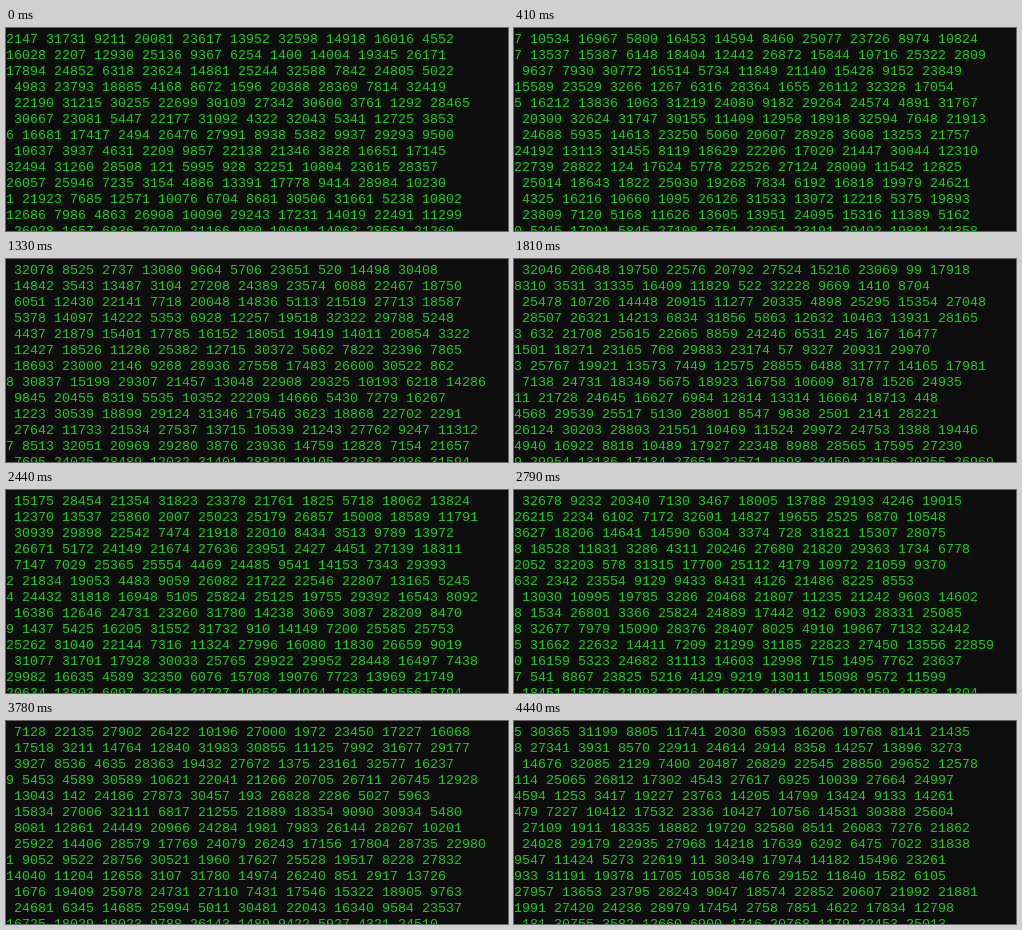
Animation of 502x203 px, one loop 4510 ms. Source, as an HTML page with a canvas:

```html
<!DOCTYPE html>
<html lang="en">
<head>
<meta charset="utf-8">
<title>Random numbers</title>
<style>
  html, body { margin: 0; width: 100%; height: 100%; overflow: hidden; background: #0d0d0d; }
  canvas { display: block; }
</style>
</head>
<body>
<canvas id="screen" width="502" height="203"></canvas>
<script>
const canvas = document.getElementById('screen');
const ctx = canvas.getContext('2d');
const CELL_W = 8, CELL_H = 16, BASELINE = 15;
const ROWS = 13, PER_ROW = 13, HIDDEN_COLS = 16;

// Screens last 70 ms, apart from a few uneven ones.
const UNEVEN = { 7: 60, 53: 80, 60: 170 };
const STEPS = 63;
const ends = [];
let LOOP = 0;
for (let i = 0; i < STEPS; i++) ends.push(LOOP += UNEVEN[i] || 70);

function seeded(seed) {
  let s = seed;
  return () => {
    s = (s + 0x6d2b79f5) | 0;
    let x = Math.imul(s ^ (s >>> 15), s | 1);
    x ^= x + Math.imul(x ^ (x >>> 7), x | 61);
    return ((x ^ (x >>> 14)) >>> 0) / 4294967296;
  };
}

// The left edge of the view cuts off the first columns of every line.
function makeScreen(step) {
  const random = seeded(step * 7919 + 1);
  const number = () => Math.floor(random() * 32768);
  return Array.from({ length: ROWS }, () =>
    Array.from({ length: PER_ROW }, number).join(' ').slice(HIDDEN_COLS));
}

function draw(lines) {
  ctx.fillStyle = '#0d0d0d';
  ctx.fillRect(0, 0, canvas.width, canvas.height);
  ctx.fillStyle = '#14d414';
  ctx.font = '13.333px "Liberation Mono", monospace';
  lines.forEach((line, row) => {
    [...line].forEach((char, col) => {
      if (char !== ' ') ctx.fillText(char, col * CELL_W, BASELINE + row * CELL_H);
    });
  });
}

const start = performance.now();
let shown = -1;

function tick() {
  const time = (performance.now() - start) % LOOP;
  const step = ends.findIndex(end => time < end);
  if (step !== shown) {
    draw(makeScreen(step));
    shown = step;
  }
  requestAnimationFrame(tick);
}
tick();
</script>
</body>
</html>
```
